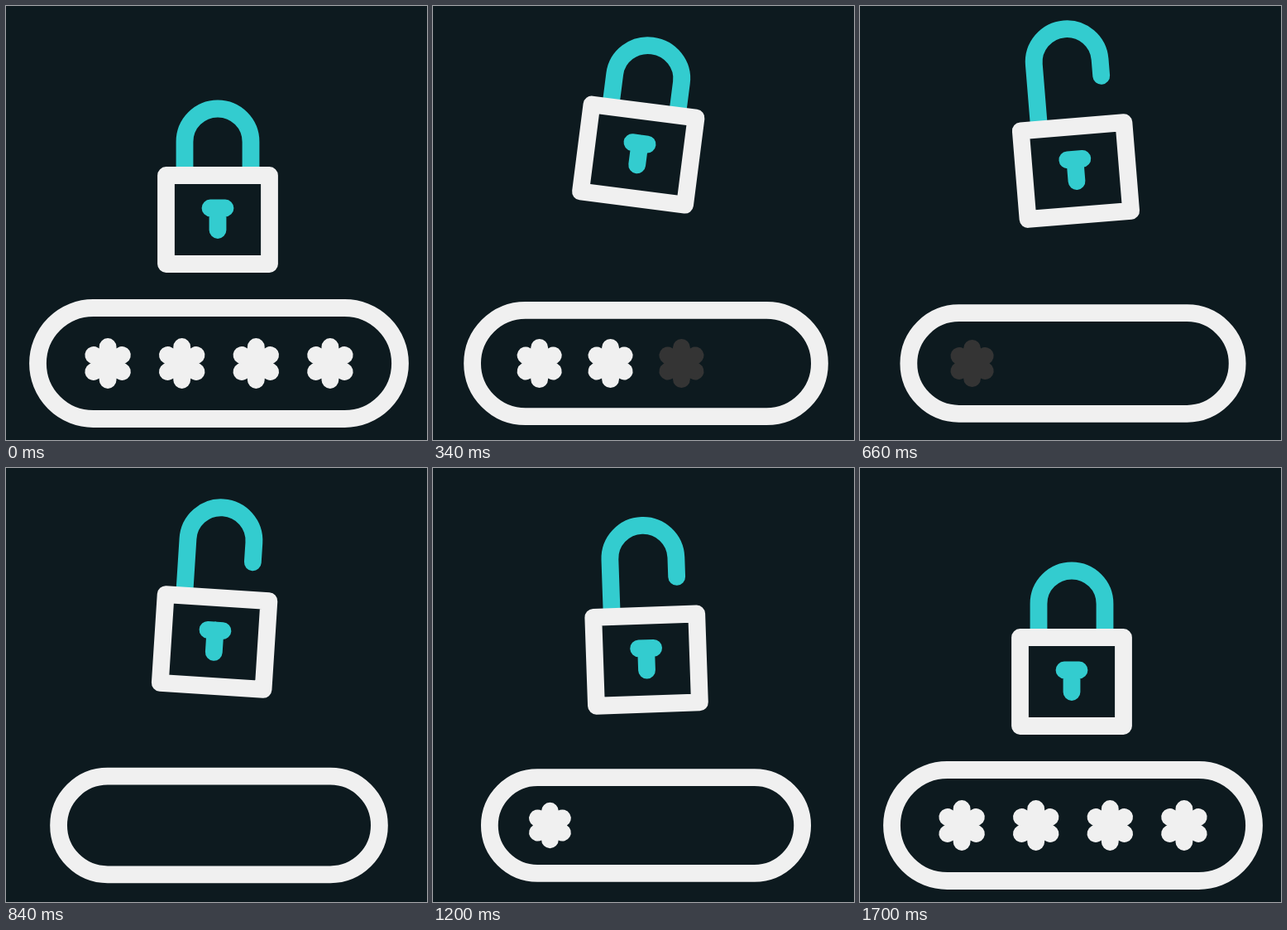
These frames come from a looping animation (509x524 px, 1800 ms). An HTML page with a canvas:

```html
<!DOCTYPE html>
<html lang="en">
<head>
<meta charset="utf-8">
<title>Padlock and passcode</title>
<style>
  html, body { margin: 0; width: 100%; height: 100%; overflow: hidden; background: #0d1a1f; }
  canvas { display: block; }
</style>
</head>
<body>
<canvas id="stage" width="509" height="524"></canvas>
<script>
const ctx = document.getElementById('stage').getContext('2d');
const LOOP = 1800, START = 110, BG = '#0d1a1f', WHITE = '#f0f0f0', TEAL = '#33cccf';

// Progress from 0 to 1 between two times: even, eased, or there and back.
const linear = (t, from, to) => Math.min(1, Math.max(0, (t - from) / (to - from)));
const ease = (t, from, to) => (1 - Math.cos(Math.PI * linear(t, from, to))) / 2;
const bump = (t, from, to) => Math.sin(Math.PI * linear(t, from, to));

// Scales the path but keeps the line width.
function outline(color, sx, sy, build) {
  ctx.save();
  ctx.scale(sx, sy);
  ctx.beginPath();
  build();
  ctx.restore();
  ctx.strokeStyle = color;
  ctx.stroke();
}

function line(x0, y0, x1, y1) {
  ctx.moveTo(x0, y0);
  ctx.lineTo(x1, y1);
}

// Damped swing in radians.
function swing(t) {
  const decay = (1 - linear(t, 325, 1440)) ** 0.85;
  const degrees = 7.5 * decay * ease(t, START, 325) * Math.cos(Math.PI * Math.max(0, t - 325) / 285);
  return degrees * Math.PI / 180;
}

function drawLock(t) {
  // Leap up, drop back a little, then sink steadily.
  const y = 258 - 99 * ease(t, START, 210) + 21 * ease(t, 210, 340) + 78 * linear(t, 340, 1640);
  const lift = 38 * ease(t, 430, 670) - 9.6 * ease(t, 670, 840) - 28.4 * ease(t, 1260, 1570);
  const leap = bump(t, START, 280), settle = bump(t, 260, 620), close = bump(t, 1340, 1540);
  const sx = 1 - 0.04 * leap + 0.026 * settle + 0.02 * close;
  const sy = 1 + 0.05 * leap - 0.015 * settle;
  const bend = -94 - lift, legEnd = bend + 34 - 0.37 * lift;

  ctx.save();
  ctx.translate(256, y - 61);
  ctx.rotate(swing(t));
  ctx.translate(0, 61);
  outline(TEAL, sx, sy, () => {
    ctx.moveTo(-40, -54);
    ctx.lineTo(-40, bend);
    ctx.arc(0, bend, 40, Math.PI, 0);
    ctx.lineTo(40, legEnd);
  });
  outline(WHITE, sx, sy, () => ctx.rect(-62.5, -53.5, 125, 107));
  outline(TEAL, sx, sy, () => {
    line(-9, -14, 9, -14);
    line(0, -14, 0, 12.5);
  });
  ctx.restore();
}

function drawPasscode(t) {
  const shrunk = 1 - 0.137 * Math.sin(Math.PI / 2 * linear(t, 116, 1266));
  const pill = shrunk + 0.224 * ease(t, 1200, 1320) - 0.087 * ease(t, 1320, 1440);
  const stars = shrunk + 0.137 * ease(t, 1200, 1690);

  ctx.save();
  ctx.translate(257.5, 431.5);
  outline(WHITE, pill, pill, () => ctx.roundRect(-219, -67, 438, 134, 67));
  for (let i = 0; i < 4; i++) {
    const hideAt = 103 + 160 * (3 - i), showAt = 1075 + 160 * i;
    const shown = 1 - linear(t, hideAt, hideAt + 90) + linear(t, showAt, showAt + 90);
    if (!shown) continue;
    const x = (i - 1.5) * 89.6;
    outline(`hsl(0 0% ${9 + 85 * shown}%)`, stars, stars, () => {
      for (let k = 0; k < 3; k++) {
        const a = Math.PI * (k / 3 + 0.5), dx = 20 * Math.cos(a), dy = 20 * Math.sin(a);
        line(x - dx, -dy, x + dx, dy);
      }
    });
  }
  ctx.restore();
}

function frame() {
  const t = performance.now() % LOOP;
  ctx.fillStyle = BG;
  ctx.fillRect(0, 0, 509, 524);
  ctx.lineWidth = 20.8;
  ctx.lineCap = ctx.lineJoin = 'round';
  drawLock(t);
  drawPasscode(t);
  requestAnimationFrame(frame);
}
frame();
</script>
</body>
</html>
```
